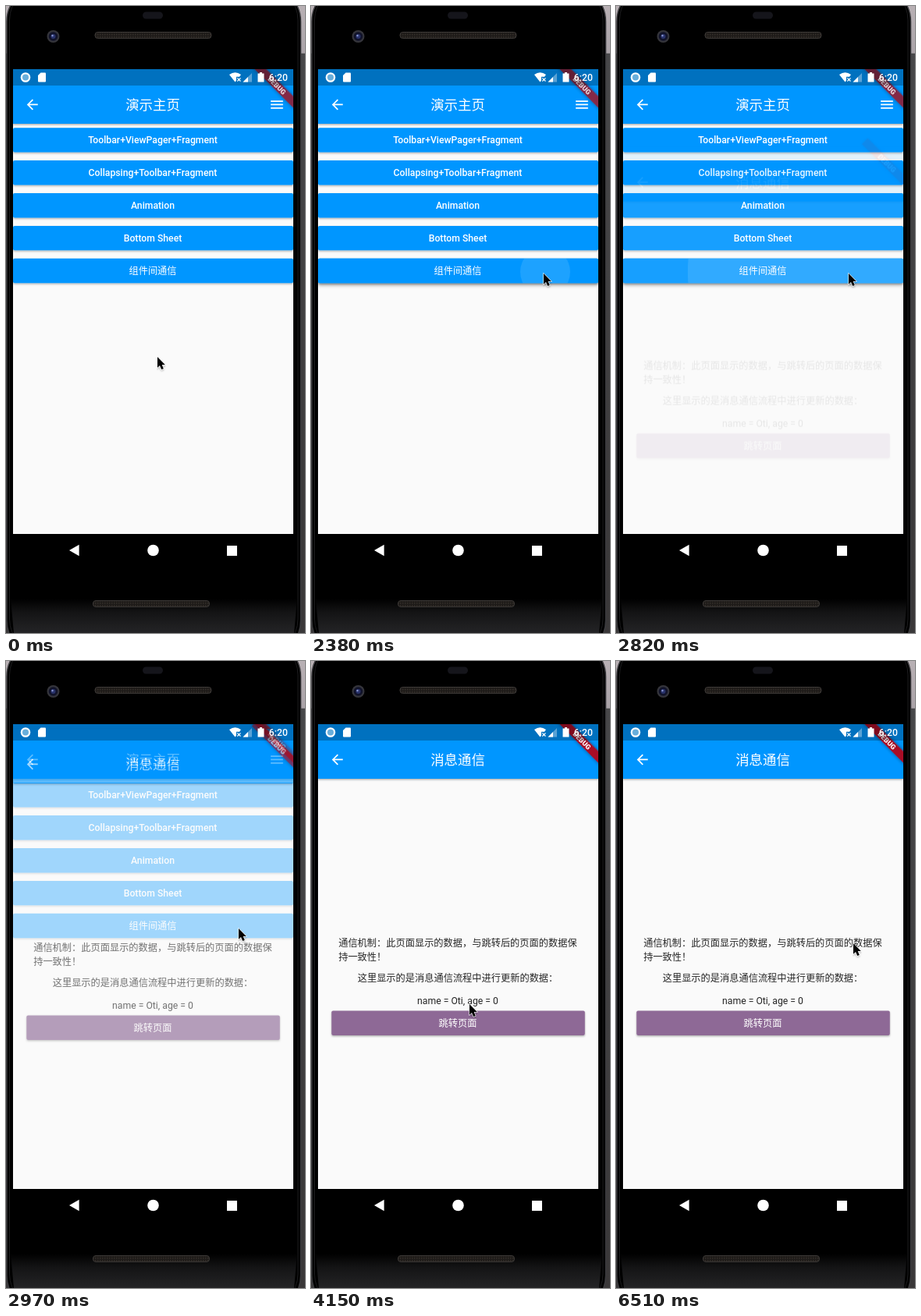
Recreate the animation shown at these times as an HTML page. Size 383x804 px, loop 8 s.

```html
<!DOCTYPE html>
<html lang="zh-CN">
<head>
<meta charset="utf-8">
<style>
html, body { margin: 0; height: 100%; overflow: hidden; background: #000; }
svg { display: block; width: 383px; height: 804px; }
text { font: 12.22px Roboto, "Noto Sans CJK SC", "Noto Sans CJK", sans-serif; fill: #fff; text-anchor: middle; }
.title { font-size: 17.46px; }
.label { font-weight: 500; }
.cjk { font-weight: 400; }
.body text { fill: #262626; }
.body .left { text-anchor: start; }
.flag { font-size: 8.9px; font-weight: 900; }
</style>
</head>
<body>
<svg viewBox="0 0 383 804">
  <defs>
    <linearGradient id="chin" x2="0" y2="1">
      <stop stop-color="#000"/><stop offset=".4" stop-color="#141415"/><stop offset="1" stop-color="#242426"/>
    </linearGradient>
    <linearGradient id="side" x2="0" y2="1">
      <stop stop-color="#b8b0b4"/><stop offset=".075" stop-color="#aaa3a8"/>
      <stop offset=".076" stop-color="#48484a"/><stop offset="1" stop-color="#3a3839"/>
    </linearGradient>
    <pattern id="mesh" width="3" height="3" patternUnits="userSpaceOnUse">
      <rect width="3" height="3" fill="#1d1a18"/><rect width="1.5" height="1.5" fill="#37312c"/>
    </pattern>
    <filter id="drop" x="-10%" y="-20%" width="120%" height="160%">
      <feDropShadow dx="0" dy="1.3" stdDeviation="1" flood-opacity=".32"/>
    </filter>
    <filter id="lift" x="-10%" y="-20%" width="120%" height="180%">
      <feDropShadow dx="0" dy="3" stdDeviation="2" flood-opacity=".32"/>
    </filter>
    <filter id="halo" x="-10%" y="-80%" width="120%" height="260%">
      <feDropShadow dx="0" dy="0" stdDeviation="2.2" flood-opacity=".5"/>
    </filter>
    <clipPath id="screen"><path d="M9 81H368V677H9z"/></clipPath>
    <clipPath id="pressed"><rect x="9" y="323.8" width="359" height="31.4" rx="2"/></clipPath>
    <g id="bar">
      <path d="M9 81H368V151H9z" fill="#0096ff" filter="url(#drop)"/>
      <path transform="translate(23.3 116) scale(.873)" fill="#fff"
        d="M20 11H7.83l5.59-5.59L12 4l-8 8 8 8 1.41-1.41L7.83 13H20v-2z"/>
    </g>
    <g id="banner" transform="translate(368 81) rotate(45)">
      <path d="M-40 24.4H40V34.9H-40z" filter="url(#halo)"/>
      <text class="flag" y="32.8">DEBUG</text>
    </g>
  </defs>

  <!-- phone -->
  <path d="M0 0H383V804H0z" fill="url(#side)"/>
  <rect x="1" y="-26" width="376.5" height="860" rx="46" stroke="#3b3b3e" stroke-width="1.5"/>
  <rect x="4.5" y="-26" width="369.5" height="856" rx="44" stroke="#1d1d1f"/>
  <path d="M6 760H373L369 804H10z" fill="url(#chin)"/>
  <rect x="175" y="7.5" width="26" height="9" rx="4.5" fill="#15151b"/>
  <circle cx="60.5" cy="39" r="8" fill="#35353b"/>
  <circle cx="60.5" cy="39" r="5.8" fill="#11132a"/>
  <circle cx="60.5" cy="39" r="3" fill="#29336c"/>
  <circle cx="59.5" cy="38" r="1.2" fill="#8b99d2"/>
  <g fill="url(#mesh)" stroke="#3a3735">
    <rect x="114" y="33.5" width="149" height="8" rx="3.5"/>
    <rect x="111.5" y="762.5" width="149" height="8" rx="3.5"/>
  </g>
  <g fill="#fff">
    <path d="M81 698L93.6 690.8V705.2z"/>
    <circle cx="188.5" cy="698" r="7.3"/>
    <path d="M283 692H296V705H283z"/>
  </g>

  <g clip-path="url(#screen)">
    <g>
      <path d="M9 81H368V677H9z" fill="#fafafa"/>
      <g id="buttons"></g>
      <g id="press">
        <rect x="9" y="323.8" width="359" height="31.4" rx="2" fill="#0096ff" filter="url(#lift)"/>
        <circle id="ripple" cx="300" cy="341" fill="#fff" fill-opacity=".115" clip-path="url(#pressed)"/>
      </g>
      <text class="label cjk" x="188" y="343.8">组件间通信</text>
      <use href="#bar"/>
      <text class="title" x="188" y="133.2">演示主页</text>
      <path transform="translate(336.5 116) scale(.873)" fill="#fff" d="M3 18h18v-2H3zm0-5h18v-2H3zm0-7v2h18V6z"/>
      <use href="#banner" fill="#961e37" fill-opacity=".85"/>
    </g>

    <g id="detail">
      <path d="M9 81H368V677H9z" fill="#fafafa"/>
      <use href="#bar"/>
      <text class="title" x="188" y="133.2">消息通信</text>
      <g class="body">
        <text class="left" x="35.2" y="365.5">通信机制：此页面显示的数据，与跳转后的页面的数据保</text>
        <text class="left" x="35.2" y="383.7">持一致性！</text>
        <text x="188" y="411">这里显示的是消息通信流程中进行更新的数据：</text>
        <text x="188" y="439.7">name = Oti, age = 0</text>
      </g>
      <rect x="26.3" y="448.5" width="324.5" height="31.4" rx="2" fill="#8e6996" filter="url(#drop)"/>
      <text class="label cjk" x="188" y="468.8">跳转页面</text>
      <use href="#banner" fill="#a90f27"/>
    </g>

    <!-- status bar -->
    <path d="M9 81H368V102H9z" fill-opacity=".25"/>
    <g fill="#fff">
      <circle cx="25" cy="91.5" r="6.3"/>
      <circle cx="25" cy="91.5" r="4" fill="#68aedb"/>
      <path d="M44.5 85.5H50Q51 85.5 51 86.5V96.5Q51 97.5 50 97.5H42Q41 97.5 41 96.5V89z"/>
      <path d="M286 88Q293.5 82.5 301 88L299 90.7H295V95.6L293.5 97.5z"/>
      <path d="M296.3 92.3l4.2 4.2m0-4.2l-4.2 4.2" stroke="#fff" stroke-width="1.2"/>
      <path d="M303.5 97.5H315V86z" fill-opacity=".35"/>
      <path d="M303.5 97.5H310V91z"/>
      <path d="M322.5 86.5H325V85H328V86.5H330.5V97.5H322.5z"/>
      <text class="label" x="348.8" y="96.3">6:20</text>
    </g>
  </g>

  <path id="cursor" d="M0 0V13.8L3 11 5.2 16 7.8 14.9 5.7 10H9.8z" stroke="#fff" stroke-width="1.1" paint-order="stroke" filter="url(#drop)"/>
</svg>
<script>
const $ = id => document.getElementById(id);
const LOOP = 8000, TICK = 148, PRESS = 16, ENTER = 2720;

const labels = ['Toolbar+ViewPager+Fragment', 'Collapsing+Toolbar+Fragment', 'Animation', 'Bottom Sheet', ''];
$('buttons').innerHTML = labels.map((label, i) => {
  const y = 156.2 + 41.9 * i;
  return `<rect x="9" y="${y}" width="359" height="31.4" rx="2" fill="#0096ff" filter="url(#drop)"/>
    <text class="label" x="188" y="${y + 20.1}">${label}</text>`;
}).join('');

// Pointer moves in ticks: start, end, destination x, y
const moves = [
  [2, 4, 308, 392], [5, 9, 298, 343], [21, 23, 204, 422], [23, 25, 160, 467], [25, 28, 203, 440],
  [29, 32, 57, 372], [32, 35, 168, 367], [36, 39, 299, 358], [41, 44, 304, 362]
];
const progress = (now, from, to) => Math.min(1, Math.max(0, (now - from) / (to - from)));

function pointer(tick) {
  let x = 194, y = 450;
  for (const [from, to, toX, toY] of moves) {
    const k = progress(tick, from, to) ** 2;
    x += (toX - x) * k;
    y += (toY - y) * k;
  }
  return `translate(${x} ${y})`;
}

function draw(now) {
  const tick = Math.floor((now % LOOP + 6) / TICK); // the screen refreshes once per tick
  $('cursor').setAttribute('transform', pointer(tick));

  $('press').setAttribute('opacity', +(tick >= PRESS && tick < PRESS + 4));
  $('ripple').setAttribute('r', Math.max(0, 32 + 58.7 * (tick - PRESS)));

  // the new page fades in while it slides up by a quarter of the screen
  const p = progress(tick * TICK, ENTER, ENTER + 300);
  $('detail').setAttribute('opacity', p ** 2);
  $('detail').setAttribute('transform', `translate(0 ${149 * (1 - p ** 1.7) ** 2.8})`);
}

const start = performance.now();
function loop() {
  draw(performance.now() - start);
  requestAnimationFrame(loop);
}
loop();
</script>
</body>
</html>
```
